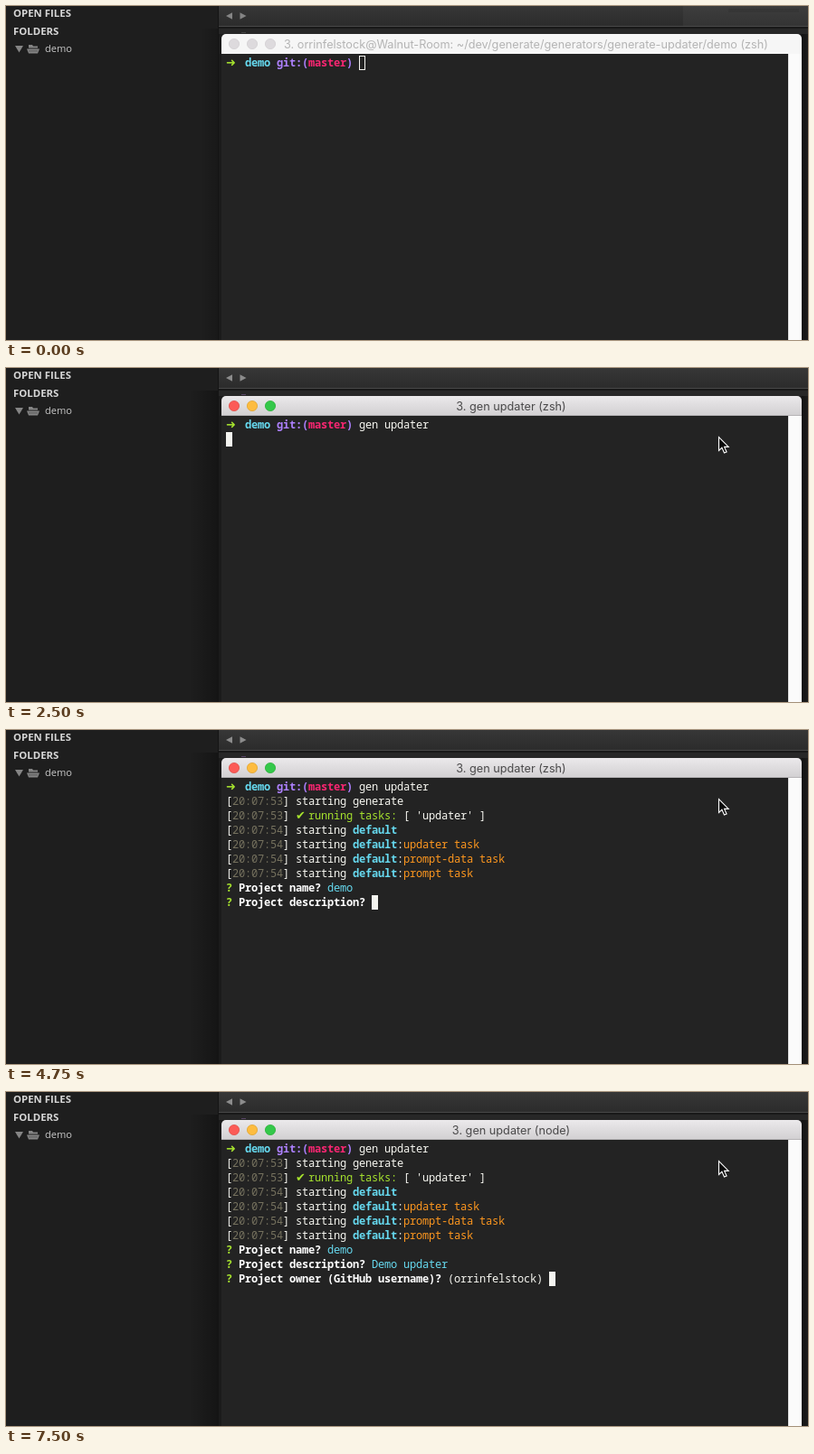
Write an HTML page with a canvas that moves like this. It is 886 by 370 pixels and loops after 8000 ms.

```html
<!DOCTYPE html>
<html lang="en">
<head>
<meta charset="utf-8">
<title>Terminal session</title>
<style>
html, body { margin: 0; width: 100%; height: 100%; overflow: hidden; background: #1e1e1e; }
canvas { display: block; width: 886px; height: 370px; }
</style>
</head>
<body>
<canvas id="stage"></canvas>
<script>
const W = 886, H = 370, LOOP = 8000;
const canvas = document.getElementById('stage');
const dpr = window.devicePixelRatio || 1;
canvas.width = W * dpr;
canvas.height = H * dpr;
const ctx = canvas.getContext('2d');
ctx.scale(dpr, dpr);

const MONO = '"Noto Sans Mono", "DejaVu Sans Mono", monospace';
const SYMBOL = '"DejaVu Sans", sans-serif';
const UI = 'Inter, Roboto, sans-serif';
const SIDE = '"Open Sans", "Noto Sans", sans-serif';
const C = {
  white: '#f8f8f2', cyan: '#66d9ef', purple: '#ae81ff', pink: '#f92672',
  green: '#a6e22e', orange: '#fd971f', grey: '#75715e'
};

// Terminal grid
const CELL = 7, ROW = 16, LEFT = 243, TOP = 55;

const USER = 'orrinfelstock';
const PATH_TITLE = `3. ${USER}@Walnut-Room: ~/dev/generate/generators/generate-updater/demo (zsh)`;
const COMMAND = 'gen updater';
const ANSWER = 'Demo updater';

// Each step is [start time, value]; the latest one reached wins.
const COMMAND_STEPS = [[0, 0], [1000, 3], [1250, 5], [1500, 8], [1750, 11]];
const ANSWER_STEPS = [[0, 0], [5500, 1], [5750, 3], [6000, 5], [6250, 8], [6500, 11], [6750, 12]];
const TITLE_STEPS = [[0, PATH_TITLE], [2500, '3. gen updater (zsh)'], [5750, '3. gen updater (node)']];

function valueAt(t, steps) {
  let value = steps[0][1];
  for (const [start, next] of steps) if (t >= start) value = next;
  return value;
}

// A run of text: [string, colour, bold]
const run = (text, color = C.white, bold = false) => [text, color, bold];
const stamp = time => [run('['), run(time, C.grey), run('] ')];
const starting = (task) => [
  ...stamp('20:07:54'), run('starting '), run('default', C.cyan, true),
  ...(task ? [run(':'), run(task, C.orange)] : [])
];
const ask = (question, ...rest) => [
  run('? ', C.green, true), run(question + ' ', '#ffffff', true), ...rest
];

function linesAt(t) {
  const lines = [[
    run('➜  ', C.green, true), run('demo ', C.cyan, true), run('git:(', C.purple, true),
    run('master', C.pink, true), run(') ', C.purple, true),
    run(COMMAND.slice(0, valueAt(t, COMMAND_STEPS)))
  ]];
  if (t >= 2750) lines.push([...stamp('20:07:53'), run('starting generate')]);
  if (t >= 3250) {
    lines.push([...stamp('20:07:53'), run('✔ running tasks:', C.green), run(" [ 'updater' ]")]);
  }
  if (t >= 3500) {
    lines.push(starting(), starting('updater task'), starting('prompt-data task'), starting('prompt task'));
    lines.push(ask('Project name?', t < 4750 ? run('(demo) ') : run('demo', C.cyan)));
  }
  if (t >= 4750) {
    const typed = ANSWER.slice(0, valueAt(t, ANSWER_STEPS));
    lines.push(ask('Project description?', run(typed, t < 7500 ? C.white : C.cyan)));
  }
  if (t >= 7500) lines.push(ask('Project owner (GitHub username)?', run(`(${USER}) `)));
  // Output in progress leaves the cursor on a fresh line.
  if (t >= 2500 && t < 3500) lines.push([]);
  return lines;
}

function rect(x, y, w, h, fill) {
  ctx.fillStyle = fill;
  ctx.fillRect(x, y, w, h);
}

function gradient(x0, y0, x1, y1, ...colors) {
  const g = ctx.createLinearGradient(x0, y0, x1, y1);
  colors.forEach((c, i) => g.addColorStop(i / (colors.length - 1), c));
  return g;
}

function polygon(fill, ...points) {
  ctx.fillStyle = fill;
  ctx.beginPath();
  points.forEach(([x, y]) => ctx.lineTo(x, y));
  ctx.closePath();
  ctx.fill();
}

function label(text, x, y, font, color, align = 'left') {
  ctx.font = font;
  ctx.fillStyle = color;
  ctx.textAlign = align;
  ctx.fillText(text, x, y);
}

function drawSidebar(active) {
  rect(0, 0, 234, H, '#1e1e1e');
  const edge = active ? 202 : 214;
  rect(edge, 25, 234 - edge, H - 25,
    gradient(edge, 0, 234, 0, 'rgba(0,0,0,0)', active ? 'rgba(0,0,0,.3)' : 'rgba(0,0,0,.18)'));

  label('OPEN FILES', 8, 12, `bold 11.4px ${SIDE}`, '#d6d6d6');
  label('FOLDERS', 8, 32, `bold 11.4px ${SIDE}`, '#d6d6d6');
  label('demo', 43, 51, `11.1px ${SIDE}`, '#c8c8c8');

  polygon('#858585', [10, 44], [19, 44], [14.5, 51.5]);
  polygon('#858585', [25, 43], [29, 43], [30, 44.5], [35, 44.5], [35, 46.5], [25, 46.5]);
  polygon('#858585', [23, 47.5], [37, 47.5], [35, 52.5], [25, 52.5]);
  rect(25, 49.5, 10, 0.8, '#4a4a4a');
}

function drawEditor(t, active) {
  rect(234, 0, W - 234, H, '#1b1b1b');
  rect(234, 0, W - 234, 22, gradient(0, 0, 0, 22, '#373737', '#2c2c2c'));
  if (t < 250) {
    rect(748, 0, 138, 22, gradient(0, 0, 0, 22, '#3d3d3d', '#343434'));
    rect(798, 3, 78, 4, 'rgba(0,0,0,.08)');
  }
  rect(234, 22, W - 234, 1, '#484848');
  rect(234, 23, W - 234, 2, '#191919');
  rect(234, 25, W - 234, 6, '#272727');
  rect(234, 0, 1, H, '#141414');
  rect(260, 29, 5, 1, active ? '#594667' : '#454545');

  const arrow = active ? '#8c8c8c' : '#858585';
  polygon(arrow, [243, 11], [250, 7.3], [250, 14.7]);
  polygon(arrow, [265.5, 11], [258.5, 7.3], [258.5, 14.7]);

  rect(879, 31, 7, H - 31, gradient(879, 0, 886, 0, '#131313', '#1c1c1c'));
}

function drawWindow(t, active) {
  rect(238, 50, 626, H - 50, '#232323');
  rect(864, 50, 15, H - 50, '#fbfbfb');
  rect(864, 53, 1, H - 53, '#e6e6e6');

  ctx.beginPath();
  ctx.moveTo(238, 53);
  ctx.lineTo(238, 36);
  ctx.arcTo(238, 31, 243, 31, 5);
  ctx.lineTo(874, 31);
  ctx.arcTo(879, 31, 879, 36, 5);
  ctx.lineTo(879, 53);
  ctx.closePath();
  ctx.fillStyle = active ? gradient(0, 31, 0, 53, '#ebe9eb', '#d1cfd1') : '#f6f6f6';
  ctx.fill();
  if (active) rect(238, 52, 641, 1, '#b5b3b5');

  const lights = active ? ['#fc5b57', '#fdbc40', '#34c84a'] : ['#dddadd', '#dddadd', '#dddadd'];
  const rims = active ? ['#e0443e', '#dfa023', '#1dac2c'] : ['#cfcccf', '#cfcccf', '#cfcccf'];
  lights.forEach((color, i) => {
    ctx.beginPath();
    ctx.arc(252 + 20 * i, 42, 5.6, 0, Math.PI * 2);
    ctx.fillStyle = color;
    ctx.fill();
    ctx.strokeStyle = rims[i];
    ctx.lineWidth = 0.7;
    ctx.stroke();
  });

  const title = valueAt(t, TITLE_STEPS);
  const long = title === PATH_TITLE;
  label(title, long ? 307 : 558, 47, `12.7px ${UI}`, active ? '#4a494a' : '#b4b4b4',
    long ? 'left' : 'center');
}

function drawTerminal(t, active) {
  const lines = linesAt(t);
  let col = 0;
  lines.forEach((runs, row) => {
    const baseline = TOP + row * ROW + 12;
    col = 0;
    for (const [text, color, bold] of runs) {
      for (const ch of text) {
        const symbol = ch === '➜' || ch === '✔';
        const font = symbol ? `bold 13px ${SYMBOL}` : `${bold ? 'bold ' : ''}12px ${MONO}`;
        if (ch !== ' ') label(ch, LEFT + col * CELL, baseline, font, color);
        col++;
      }
    }
  });

  const x = LEFT + col * CELL, y = TOP + (lines.length - 1) * ROW;
  if (active) {
    rect(x, y, CELL, ROW, '#f4f4f0');
  } else {
    ctx.strokeStyle = '#f4f4f0';
    ctx.lineWidth = 1;
    ctx.strokeRect(x + 0.5, y + 0.5, CELL - 1, ROW - 1);
  }
}

function drawPointer(x, y) {
  ctx.beginPath();
  [[0, 0], [0, 15], [3.4, 11.8], [6, 17.5], [8.6, 16.4], [6.1, 10.9], [10.7, 10.9]]
    .forEach(([dx, dy]) => ctx.lineTo(x + dx, y + dy));
  ctx.closePath();
  ctx.fillStyle = '#0a0a0a';
  ctx.fill();
  ctx.strokeStyle = '#ffffff';
  ctx.lineWidth = 1.1;
  ctx.stroke();
}

function frame(now) {
  const t = now % LOOP;
  const active = t >= 500;
  ctx.textBaseline = 'alphabetic';
  drawEditor(t, active);
  drawSidebar(active);
  drawWindow(t, active);
  drawTerminal(t, active);
  if (t >= 250) drawPointer(787.5, active ? 76.5 : 65);
  requestAnimationFrame(frame);
}
requestAnimationFrame(frame);
</script>
</body>
</html>
```
